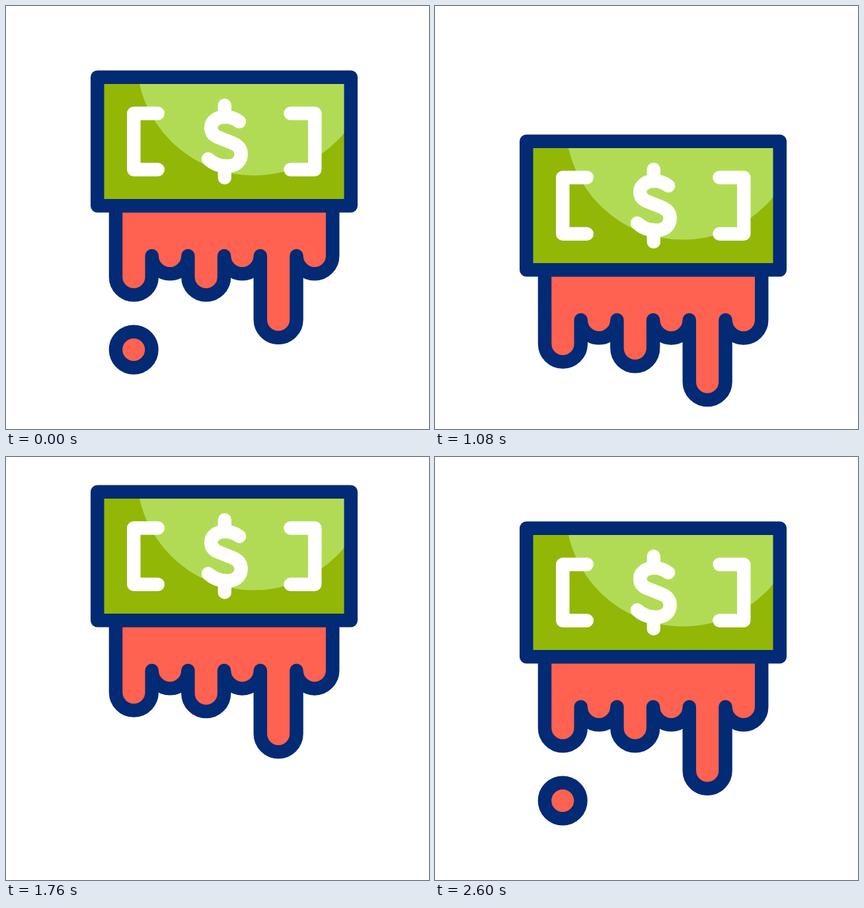
Write an HTML page that moves like this. It is 640 px wide and 640 px high and loops after 2.82 s.

```html
<!DOCTYPE html>
<html lang="en">
<head>
<meta charset="utf-8">
<title>Dripping banknote</title>
<style>
  html, body { margin: 0; width: 100%; height: 100%; overflow: hidden; background: #fff; }
  svg { display: block; width: 100%; height: 100%; }
  .outline { stroke: #032a74; stroke-width: 20.5; stroke-linejoin: round; }
  .blood { fill: #ff6251; }
  .mark { fill: none; stroke: #fff; stroke-width: 20.5; stroke-linecap: round; stroke-linejoin: round; }
</style>
</head>
<body>
<svg viewBox="0 0 640 640">
  <defs>
    <clipPath id="paper"><rect x="138" y="108" width="384" height="194"/></clipPath>
  </defs>
  <circle id="drop" class="outline blood"/>
  <g id="note">
    <path id="drips" class="outline blood"/>
    <rect x="138" y="108" width="384" height="194" fill="#92b707"/>
    <circle cx="375" cy="79.2" r="177.3" fill="#b2db55" clip-path="url(#paper)"/>
    <rect class="outline" x="138.25" y="107.75" width="383.5" height="194.5" fill="none"/>
    <path class="mark" d="M229.75 162.4H193.25V247.6H229.75M430.5 162.4H467.25V247.6H430.5"/>
    <path class="mark" d="M330.8 150.2V168M330.8 242V259.8M353 175C344 168.5 335 167 327 168C316 169.5 310.2 177 310.2 184C310.2 192 315 196.5 322 199L343 207.5C351 210.5 355.7 216 355.7 224C355.7 234 349 240.5 340 241.8C326 243.5 315 240 306 231.5"/>
  </g>
</svg>
<script>
const LOOP = 2820;
const [drop, note, drips] = ['drop', 'note', 'drips'].map(id => document.getElementById(id));

// Smooth progress from 0 to 1 between two times.
function ease(t, from, to) {
  const x = Math.min(1, Math.max(0, (t - from) / (to - from)));
  return x * x * (3 - 2 * x);
}

const pulse = (t, from, peak, to) => ease(t, from, peak) - ease(t, peak, to);

function noteOffset(t) {
  return 129 * ease(t, 200, 900) - 192.5 * ease(t, 900, 1600) + 63.5 * ease(t, 1600, 2300);
}

function dripPath(main, side) {
  const width = 54.7, top = 378, left = 166;
  const arc = `a27.35 27.35 0 0 0 ${width} 0`;
  const bottoms = [410 + 39.2 * side, top, 410 + 101.5 * main, top, 474.5 - 27.3 * side, top];
  const lobes = bottoms.map((y, i) => {
    const x = left + i * width;
    const shift = i ? 0 : 0.7 * side;
    return `L${x + shift} ${y}${arc}L${x + width} ${top}`;
  });
  return `M${left} 302${lobes.join('')}V302Z`;
}

function drawDrop(x, y, scale, opacity) {
  drop.setAttribute('cx', x);
  drop.setAttribute('cy', y);
  drop.setAttribute('r', 27.25 * scale);
  drop.setAttribute('opacity', opacity);
}

function draw(t) {
  const main = pulse(t, 200, 600, 1000) + pulse(t, 1000, 1400, 1800);
  const side = main + pulse(t, 1800, 2160, 2600);
  note.setAttribute('transform', `translate(0 ${noteOffset(t)})`);
  drips.setAttribute('d', dripPath(main, side));

  if (t < 1000) {
    const fall = ease(t, 200, 600);
    drawDrop(193.2 - 2 * fall, 520 + 92 * fall, 1 - 0.433 * fall, 1 - fall);
  } else {
    const grow = ease(t, 2210, 2570);
    drawDrop(193.2, 480 + 40 * grow, 0.5 + 0.5 * grow, grow);
  }
}

const start = performance.now();
function tick() {
  draw((performance.now() - start) % LOOP);
  requestAnimationFrame(tick);
}
tick();
</script>
</body>
</html>
```
